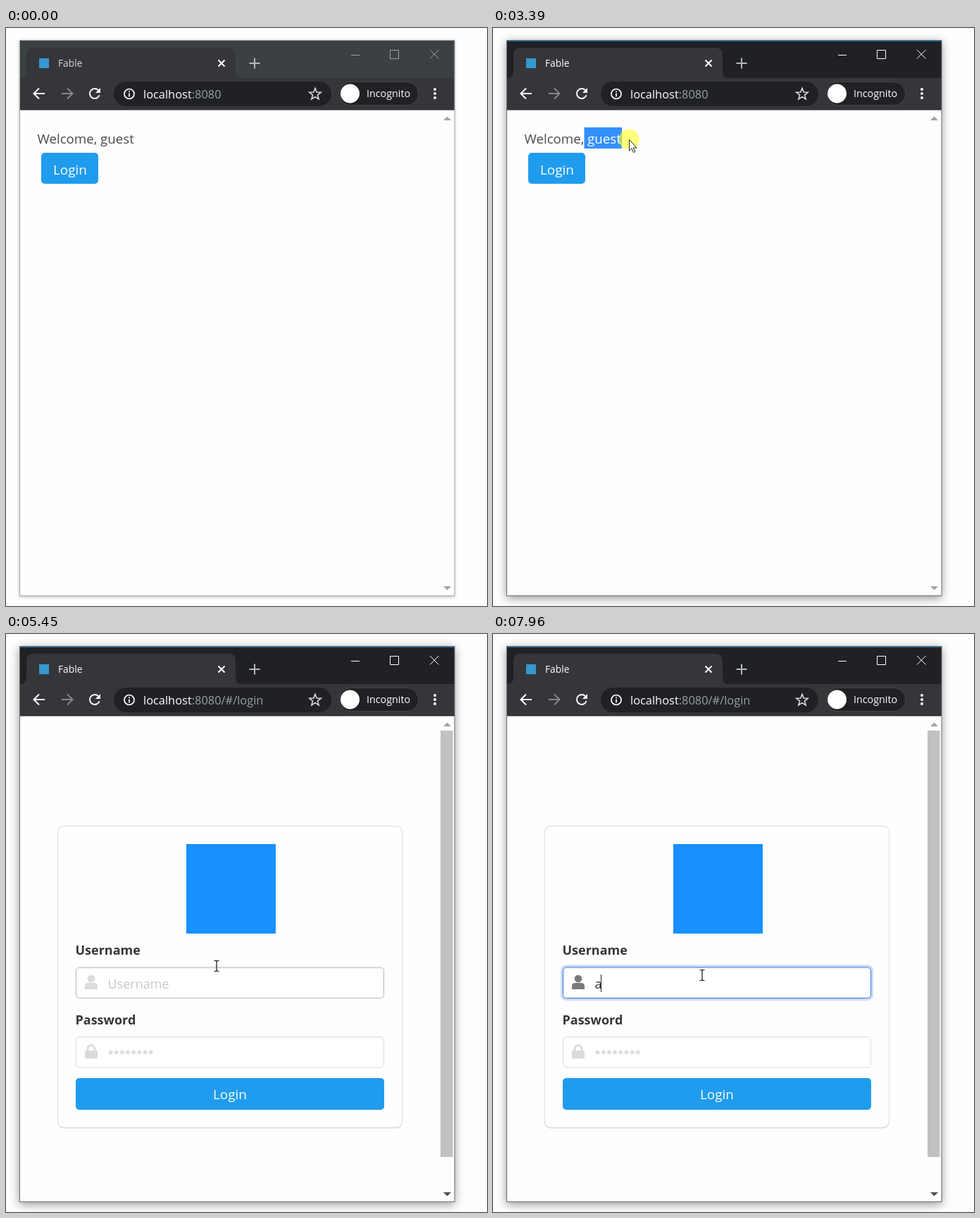
An HTML page for the animation above (8 s loop, 683 by 820 pixels).

```html
<!DOCTYPE html>
<html lang="en">
<head>
<meta charset="utf-8">
<title>Login demo</title>
<style>
  html, body { margin: 0; width: 100%; height: 100%; overflow: hidden; background: #fff; }
  svg { display: block; font-family: "Open Sans", "Noto Sans", sans-serif; }
  text { white-space: pre; }
  .line { fill: none; stroke: #fff; stroke-width: 2; }
  .thin { fill: none; stroke: #fff; stroke-width: 1; }
  .field { fill: #fff; stroke: #dbdbdb; }
  .label { font-size: 18px; font-weight: 700; fill: #363636; }
  .hint { fill: #c8c8c8; }
  .button { fill: #209cee; }
  #shadow { fill: #fff; filter: drop-shadow(0 1px 2px rgba(0,0,0,.28)); }
  #bar { fill: #3b4143; }
  #frame { fill: none; stroke: #a5a7a8; }
  #controls { opacity: .5; }
  #title { fill: #d3d5d6; }
  #topline { display: none; }
  .active #shadow { filter: drop-shadow(0 3px 7px rgba(0,0,0,.42)); }
  .active #bar { fill: #202124; }
  .active #frame { stroke: #6b6d70; }
  .active #controls { opacity: 1; }
  .active #title { fill: #fff; }
  .active #topline { display: inline; }
  #user.hover { stroke: #b5b5b5; }
  #user.focus { stroke: #3273dc; }
</style>
</head>
<body>
<svg id="stage" width="683" height="820" viewBox="0 0 683 820">
  <defs>
    <clipPath id="picked"><rect id="pickedBox" x="129.5" y="141" width="0" height="30"/></clipPath>
  </defs>
  <rect width="683" height="820" fill="#fefefe"/>

  <rect id="shadow" x="19" y="17" width="618" height="789"/>
  <rect x="19" y="17" width="618" height="789" fill="#fefefe"/>
  <rect id="bar" x="19" y="17" width="618" height="55"/>
  <path id="topline" d="M19 18H637" stroke="#1b74b4" stroke-width="2"/>
  <path fill="#35363a" d="M20 71Q29 71 29 62V38Q29 28 39 28H316Q326 28 326 38V62Q326 71 335 71H637V116H19V71Z"/>
  <path d="M19 116H637" stroke="#25262a"/>

  <rect id="favicon" x="47" y="43" width="14" height="14" fill="#3598d0"/>
  <path id="spinner" d="M54 43A7 7 0 1 1 47 50" fill="none" stroke="#8ab4f8" stroke-width="2"/>
  <text id="title" x="74" y="55" font-size="13.8">Fable</text>
  <path class="line" stroke-width="1.8" d="M301.500 45.500L310.500 54.500M310.500 45.500L301.500 54.500"/>
  <path class="line" style="stroke:#b5b8ba" d="M345.500 50H360.500M353 42.500V57.500"/>
  <path id="controls" class="thin" d="M490 38.500H502M545.500 31.500H557.500V43.500H545.500ZM602 31L614.500 43.500M614.500 31L602 43.500"/>

  <path class="line" d="M55 93H40M47 85.500L39.500 93L47 100.500"/>
  <path class="line" style="stroke:#85878a" d="M79 93H94M87 85.500L94.500 93L87 100.500"/>
  <g id="reload">
    <path class="line" d="M132.600 95.200A7 7 0 1 1 131 88.100"/>
    <path fill="#fff" d="M134 85V92H127Z"/>
  </g>
  <path id="stop" class="line" d="M120 87L132 99M132 87L120 99"/>

  <rect id="address" x="153" y="76" width="309" height="35" rx="17.500" fill="#202124" stroke-width="2"/>
  <circle class="line" style="stroke-width:1.700" cx="175" cy="93.500" r="7"/>
  <path class="line" style="stroke-width:1.700" d="M175 92.500V97.500M175 89.200V91"/>
  <text x="195" y="100" font-size="16.4" fill="#fff">localhost<tspan fill="#9aa0a6">:8080<tspan id="route">/#/login</tspan></tspan></text>
  <path id="urlCaret" d="M367.500 82V104" stroke="#fff"/>
  <path id="star" class="line" style="stroke:#dadce0;stroke-width:1.600"/>
  <rect x="473.500" y="76.500" width="112" height="33" rx="16.500" fill="#202124" stroke="#424449"/>
  <circle cx="488.500" cy="93" r="13.500" fill="#fff"/>
  <text x="512" y="98" font-size="14.3" fill="#fff">Incognito</text>
  <g fill="#fff"><circle cx="609" cy="87" r="2"/><circle cx="609" cy="93" r="2"/><circle cx="609" cy="99" r="2"/></g>

  <g id="home">
    <text x="44.500" y="164" font-size="18.7" fill="#4a4a4a">Welcome, guest</text>
    <g clip-path="url(#picked)">
      <rect x="129" y="141" width="54" height="30" fill="#3390ff"/>
      <text x="44.500" y="164" font-size="18.7" fill="#fff">Welcome, guest</text>
    </g>
    <rect class="button" x="50" y="177" width="81" height="44" rx="5"/>
    <text x="91" y="207.500" font-size="18.9" fill="#fff" text-anchor="middle">Login</text>
  </g>

  <g id="login">
    <rect x="617" y="137" width="17.500" height="605" fill="#c1c1c1"/>
    <rect x="73.500" y="273.500" width="489" height="428" rx="8" fill="#e4e4e4"/>
    <rect x="73.500" y="272.500" width="489" height="427.500" rx="8" fill="#fefefe" stroke="#dbdbdb"/>
    <rect x="256" y="298" width="127" height="127" fill="#1890ff"/>
    <text class="label" x="98.500" y="455">Username</text>
    <rect id="ring" x="97.500" y="471" width="441" height="47.500" rx="6.500" fill="none" stroke="#cbdbf5" stroke-width="3"/>
    <rect id="user" class="field" x="99.500" y="473" width="437" height="43.500" rx="5"/>
    <g id="person" fill="#dbdbdb">
      <circle cx="121" cy="489" r="5.300"/>
      <path d="M112 504V500Q112 495 117 495H125Q130 495 130 500V504Z"/>
    </g>
    <text id="userHint" class="hint" x="144.500" y="503" font-size="18">Username</text>
    <text id="typed" x="144.500" y="503" font-size="18" fill="#363636">a</text>
    <path id="userCaret" stroke="#222" d="M0 483V508"/>
    <text class="label" x="98.500" y="553.500">Password</text>
    <rect class="field" x="99.500" y="571.500" width="437" height="43.500" rx="5"/>
    <path d="M102 474.500H534M102 573H534" stroke="#f3f3f3"/>
    <rect x="112" y="591" width="18" height="11.500" rx="2" fill="#dbdbdb"/>
    <path d="M116 592V588.500A5 5 0 0 1 126 588.500V592" fill="none" stroke="#dbdbdb" stroke-width="3"/>
    <text class="hint" x="144.500" y="601" font-size="14.8">********</text>
    <rect class="button" x="99" y="630" width="438" height="45" rx="5"/>
    <text x="318" y="660" font-size="18.9" fill="#fff" text-anchor="middle">Login</text>
  </g>

  <path fill="#a3a3a3" d="M621 131L626.500 125.500L632 131Z"/>
  <path id="down" d="M621 792L626.500 797.500L632 792Z"/>
  <g id="status">
    <path fill="#35363a" d="M19 779H179Q183 779 183 783V806H19Z"/>
    <text x="25" y="797.500" font-size="14.15" fill="#bdc1c6">localhost:8080/#/login</text>
  </g>
  <rect id="frame" x="19.500" y="17.500" width="617.500" height="788"/>

  <g id="pointer">
    <circle id="press" r="14.500" fill="#ffff20" fill-opacity=".6"/>
    <path id="arrow" fill="#fff" stroke="#222" d="M.5 .5V16L4 12.800L6.500 18.500L8.800 17.500L6.300 12H11Z"/>
    <path id="hand" fill="#fff" stroke="#25252e" stroke-width="1.300" stroke-linejoin="round"
      d="M-1.500 13V1.500Q-1.500 0 0 0T1.500 1.500V8Q3 6.500 4.500 8.500Q6.500 7.500 7.500 9.500Q10 9 10 11.500V16Q10 19.500 7.500 22.500H0Q-2 20 -6 14.500Q-7 12.500 -5.500 11.500Q-3.500 11 -1.500 13ZM1.500 8V13M4.500 9V13M7.500 10V13"/>
    <path id="beam" fill="none" stroke="#111" stroke-width="1.200" d="M-3.500 -7.500H-1L0 -6.500L1 -7.500H3.500M0 -6.500V6.500M-3.500 7.500H-1L0 6.500L1 7.500H3.500"/>
  </g>
</svg>
<script>
const LOOP = 8000;
const el = id => document.getElementById(id);
const show = (id, on) => { el(id).style.display = on ? "inline" : "none"; };
const within = (t, from, to) => t >= from && t < to;

// time, x, y of the pointer's hot spot
const path = [
  [60, 574, 822], [860, 146, 286], [890, 145, 280], [1340, 125, 115], [1480, 124, 92],
  [1750, 124, 92], [2300, 187, 212], [2520, 187, 212], [2760, 130, 158], [2840, 130, 158],
  [3230, 184, 158], [3330, 184, 158], [3390, 193, 158], [3530, 193, 158], [4100, 120.5, 198],
  [4490, 120.5, 198], [4940, 305, 514], [4970, 305, 512], [5270, 303, 506], [5440, 303, 506],
  [5450, 299, 471], [5475, 299, 471], [6190, 360, 98], [6960, 360, 98], [7050, 359, 146],
  [7070, 357, 190], [7280, 297, 484]
];

// time from which each pointer shape holds
const shapes = [
  [60, "arrow"], [2700, "beam"], [3330, "arrow"], [3960, "hand"], [4510, "arrow"],
  [4830, "beam"], [5490, "arrow"], [6110, "beam"], [7000, "arrow"], [7215, "beam"]
];

const presses = [[1490, 1590], [2800, 3530], [4140, 4230], [6300, 6430], [7300, 7430]];

const ease = u => u * u * (3 - 2 * u);
const ramp = (t, from, to) => Math.min(1, Math.max(0, (t - from) / (to - from)));

function pointerAt(t) {
  const i = path.findIndex(key => key[0] > t);
  if (i < 0) return path.at(-1).slice(1);
  if (i === 0) return path[0].slice(1);
  const [t0, x0, y0] = path[i - 1], [t1, x1, y1] = path[i];
  const u = ease((t - t0) / (t1 - t0));
  return [x0 + (x1 - x0) * u, y0 + (y1 - y0) * u];
}

function drawPointer(t) {
  const [x, y] = pointerAt(t);
  el("pointer").setAttribute("transform", `translate(${Math.round(x)} ${Math.round(y)})`);
  const shape = shapes.findLast(s => s[0] <= t)?.[1];
  for (const id of ["arrow", "hand", "beam"]) show(id, id === shape);
  show("press", presses.some(p => within(t, ...p)));
  return x;
}

function draw(t) {
  const x = drawPointer(t);
  el("stage").classList.toggle("active", t >= 1500);

  const loading = within(t, 1750, 2020);
  show("favicon", !loading);
  show("spinner", loading);
  el("spinner").setAttribute("transform", `rotate(${t * 0.5} 54 50)`);
  const stoppable = within(t, 1570, 2530);
  show("stop", stoppable);
  show("reload", !stoppable);

  const selected = t < 2840 ? 0 : t < 3390 ? Math.min(53.5, Math.max(0, x - 129.5)) : 53.5;
  el("pickedBox").setAttribute("width", selected);

  const onLogin = t >= 4230;
  show("home", !onLogin);
  show("login", onLogin);
  show("route", onLogin);
  el("down").setAttribute("fill", onLogin ? "#505050" : "#a3a3a3");
  el("status").style.opacity = ramp(t, 4130, 4220) * (1 - ramp(t, 4970, 5270));

  const inAddress = within(t, 6300, 7300);
  el("address").setAttribute("stroke", inAddress ? "#48546d" : "none");
  show("urlCaret", inAddress);

  const focused = t >= 7300, typed = t >= 7960;
  el("user").classList.toggle("hover", within(t, 4850, 5490) || within(t, 7230, 7300));
  el("user").classList.toggle("focus", focused);
  show("ring", focused);
  el("person").setAttribute("fill", focused ? "#7a7a7a" : "#dbdbdb");
  show("userHint", !typed);
  show("typed", typed);
  show("userCaret", focused);
  el("userCaret").setAttribute("transform", `translate(${typed ? 153.5 : 144.5} 0)`);
}

const starPoints = Array.from({ length: 10 }, (_, i) => {
  const r = i % 2 ? 3.7 : 8.6, a = i * Math.PI / 5 - Math.PI / 2;
  return [439 + r * Math.cos(a), 94 + r * Math.sin(a)].map(v => v.toFixed(1)).join(" ");
});
el("star").setAttribute("d", `M${starPoints.join("L")}Z`);

const start = performance.now();
function tick() {
  draw((performance.now() - start) % LOOP);
  requestAnimationFrame(tick);
}
tick();
</script>
</body>
</html>
```
